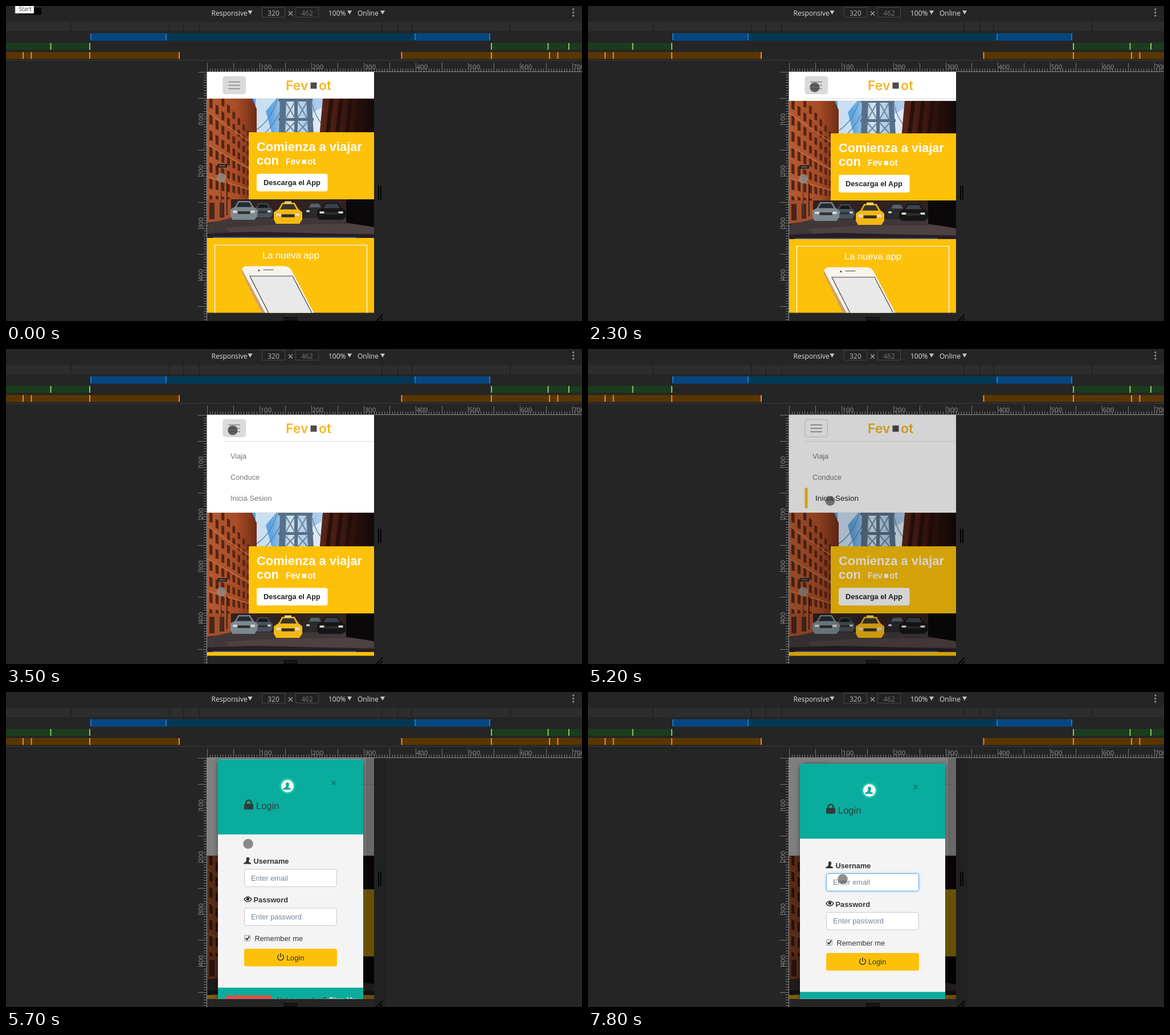
Recreate the animation shown at these times as an HTML page. Size 1011 px wide and 554 px high, loop 8 s.

```html
<!DOCTYPE html>
<html lang="es">
<head>
<meta charset="utf-8">
<title>Responsive page</title>
<style>
html, body { margin: 0; width: 100%; height: 100%; overflow: hidden; background: #252525; }
svg { display: block; width: 1011px; height: 554px; }
text { font-family: "Liberation Sans", Arial, sans-serif; font-size: 12.8px; }
.ui text { font-family: "Open Sans", "Noto Sans", sans-serif; font-size: 12px; fill: #dedede; }
.ruler text { font-family: "Open Sans", "Noto Sans", sans-serif; font-size: 11.5px; fill: #959595; }
.logo text { font-family: Inter, "Open Sans", sans-serif; font-size: 23px; font-weight: 600; }
.b { font-weight: bold; }
</style>
</head>
<body>
<svg id="stage" viewBox="0 0 1011 554"></svg>
<script>
const LOOP = 8000, SCALE = 0.915, YELLOW = '#fdc10a', TEAL = '#0aac9d';

const rect = (x, y, w, h, fill, more = '') =>
  `<rect x="${x}" y="${y}" width="${w}" height="${h}" fill="${fill}" ${more}/>`;
const text = (x, y, s, fill = '', more = '') =>
  `<text x="${x}" y="${y}" ${fill && `fill="${fill}"`} ${more}>${s}</text>`;
const path = (d, fill, more = '') => `<path d="${d}" fill="${fill}" ${more}/>`;
const line = (d, stroke, w = 1, more = '') =>
  `<path d="${d}" fill="none" stroke="${stroke}" stroke-width="${w}" ${more}/>`;
const circle = (x, y, r, fill, more = '') =>
  `<circle cx="${x}" cy="${y}" r="${r}" fill="${fill}" ${more}/>`;
const ticks = (xs, y, fill) => xs.map(x => rect(x - 1, y, 2, 12, fill)).join('');

const logo = (x, y, s, fill, mark) =>
  `<g class="logo" transform="translate(${x} ${y}) scale(${s})">` +
  text(0, 0, 'Fev', fill) + rect(43.5, -13, 11, 11, mark) + text(58, 0, 'ot', fill) + '</g>';

function toolbar() {
  const arrow = x => path(`M${x} 8h8l-4 7z`, '#c4c4c4');
  const box = (x, s, fill) => rect(x + .5, 2.5, 40, 17, '#222', 'stroke="#484848"') +
    text(x + 20.5, 17, s, '', `text-anchor="middle" style="fill:${fill}"`);
  return '<g class="ui">' + text(360.5, 17, 'Responsive') + arrow(424.5) +
    box(449, '320', '#bdbdbd') + line('M496 9.5l7 7m0-7l-7 7', '#aaa', 1.2) + box(508, '462', '#777') +
    text(566, 17, '100%') + arrow(599) + text(617, 17, 'Online') + arrow(657) +
    [6, 11.5, 17].map(y => circle(995.8, y, 1.7, '#8d8d8d')).join('') + '</g>';
}

function mediaBars() {
  return rect(0, 28, 1011, 16, '#2d2d2d') +
    [113, 286, 311, 339, 659, 687, 711, 884].map(x => rect(x, 28, 2, 16, '#222')).join('') +
    rect(148, 48, 702, 13, '#06467f') + rect(281, 48, 437, 13, '#043956') +
    ticks([149, 281, 718, 849], 48, '#1976ca') +
    rect(0, 65, 148, 12, '#1b3c1d') + rect(851, 65, 160, 12, '#1b3c1d') +
    ticks([78.5, 147, 852, 951.5, 988], 65, '#87c767') +
    rect(0, 81, 304, 12, '#593600') + rect(694, 81, 317, 12, '#593600') +
    ticks([30, 44.5, 147, 304, 694.5, 852, 954, 968.5], 81, '#f5861f') +
    rect(0, 95, 1011, 1, '#3c3c3c');
}

function rulers() {
  let h = '', v = '', labels = '';
  for (let n = 0; n <= 720; n += 5) {
    const p = n * SCALE, len = n % 50 ? 5 : 15;
    const x = Math.round(353 + p) + .5, y = Math.round(116 + p) + .5;
    h += `M${x} 115v${-len}`;
    if (y < 554) v += `M352 ${y}h${-len}`;
    if (n && n % 100 === 0) {
      labels += text(x + 1, 111, n);
      if (y < 554) labels += text(0, 0, n, '', `transform="translate(346 ${y}) rotate(-90)"`);
    }
  }
  return '<g class="ruler">' + line(h + v, '#777') +
    line('M353 115.5H1011M352.5 116V554', '#8a8a8a') + labels + '</g>';
}

function photo() {
  let s = rect(353, 163, 293, 245, 'url(#sky)');
  s += path('M438 163l36 0-18 22 10 37h-28zM538 188l20-12v46h-30z', '#eef4f8', 'opacity=".75"');
  s += line('M476 163Q465 205 432 222M488 166Q478 200 456 222M535 163Q543 200 562 215', '#5c7c9c', 1.2);
  s += path('M481 163h11l-2 60h-11zM506 163h6v60h-6zM527 163h9l4 60h-10z', '#587087');
  s += rect(478, 163, 60, 5, '#587087') + rect(478, 197, 62, 5, '#587087');
  s += line('M491 169l16 28m0-28l-16 28M512 169l16 28m0-28l-16 28M490 203l18 20m0-20l-18 20M512 203l18 20m0-20l-18 20', '#6d8498', 2);
  s += path('M353 163h79l8 18v166l-87 8z', 'url(#brick)');
  // Windows shrink towards the end of the street.
  for (let c = 0; c < 9; c++) {
    const x = 357 + c * 11 - c * c * .22, k = (x - 353) / 175;
    for (let r = 0; r < 8; r++) {
      const left = 128 + r * 29, y = left + (352 - left) * k, h = 17 * (1 - k);
      if (y > 160 && y < 336 && x < 434)
        s += path(`M${x} ${y}l${5.5 - c * .2} ${3 * (1 - k)}v${h}l${c * .2 - 5.5} -2z`, '#552516');
    }
  }
  s += line('M353 186L438 246M353 244L438 292M353 300L438 326', '#c97746', 1.3);
  s += path('M556 163h90v180H540z', 'url(#shade)');
  for (let i = 0; i < 4; i++)
    s += path(`M${568 + i * 17} 163h7l-7 60h-7z`, '#210d0a', 'opacity=".8"');
  s += rect(353, 340, 293, 68, '#30221f');
  s += path('M353 340h42v36l-42 5z', '#a34e2b') + path('M357 346h9v29h-9zM375 346h8v26h-8z', '#48251a');
  s += path('M353 383l42-10h251v35H353z', '#403738') + path('M385 390l100-6 161 0v16H395z', '#584b49', 'opacity=".55"');
  s += path('M597 340h49v49l-49-8z', '#0a0809') + path('M353 400l82-3 211 5v6H353z', '#271e25');
  const car = (x, y, w, h, body, glass) =>
    path(`M${x} ${y + h * .8}V${y + h * .45}l${w * .17}-${h * .15} ${w * .12}-${h * .3}h${w * .44}l${w * .13} ${h * .3} ${w * .14} ${h * .15}v${h * .35}l-${w * .1} ${h * .2}H${x + w * .08}z`, body) +
    path(`M${x + w * .22} ${y + h * .32}l${w * .1}-${h * .25}h${w * .38}l${w * .1} ${h * .25}z`, glass) +
    rect(x + w * .09, y + h * .51, w * .16, h * .12, '#dedbd2') + rect(x + w * .75, y + h * .51, w * .16, h * .12, '#dedbd2') +
    rect(x + w * .27, y + h * .55, w * .46, h * .14, '#302d2c');
  s += car(433, 347, 35, 25, '#47535d', '#17191d') + car(394, 343, 47, 33, '#7b8991', '#222a31');
  s += car(524, 346, 36, 26, '#28292c', '#596269') + car(546, 346, 50, 30, '#161619', '#3b4249');
  s += car(470, 346, 50, 37, '#f4b811', '#37342f') + rect(489, 343.5, 12, 4, '#fbd65e');
  s += rect(387, 310, 1.5, 58, '#291713') + rect(377, 284, 1.5, 84, '#53372c');
  s += rect(371, 278, 17, 6, '#241e20') + line('M374 281h11', '#aaa');
  s += circle(378, 302, 8.3, '#8f8c87', 'opacity=".85"');
  return s;
}

function page() {
  return '<g clip-path="url(#heroClip)">' + photo() + '</g>' +
    rect(353, 408, 293, 150, YELLOW) + rect(363, 406.5, 251, 1.5, '#4a77a8') +
    rect(426, 222, 220, 118, YELLOW) +
    text(440, 254.5, 'Comienza a viajar', '#fff', 'class="b" style="font-size:21.9px"') +
    text(440, 279, 'con', '#fff', 'class="b" style="font-size:21.9px"') +
    logo(491, 279, .66, '#fff', '#fff') +
    rect(440, 295, 124.5, 31, '#fff', 'rx="4"') + text(452, 315, 'Descarga el App', '#222', 'class="b"') +
    line('M366.5 560V420.5h267V560', '#fff', 1.2) +
    text(500, 444, 'La nueva app', '#fff', 'text-anchor="middle" style="font-size:16.5px"') +
    path('M414 463q2-5 9-5.500h65q9 0 13 7l44 84h-86z', '#f7f4ef') +
    path('M414 463l46 86h-7l-39-80z', '#cda16d') +
    path('M428 475h75l39 75h-76z', '#e9e9e9') + line('M466 550l-38-75h75l39 75', '#404040', 1.2) +
    line('M452 464h17', '#777', 1.5, 'stroke-linecap="round"') + circle(444, 465, 1.5, '#444');
}

function nav() {
  return '<rect id="navBg" x="353" y="116" width="293" height="47" fill="#fff"/>' +
    '<rect id="navEdge" x="353" width="293" height="1" fill="#e3e3e3"/>' +
    '<rect id="divider" x="381" y="162" width="265" height="1" fill="#dedede"/>' +
    '<rect id="burger" x="381" y="124" width="39.500" height="30.500" rx="4" stroke="#d0d0d0"/>' +
    line('M390.500 133.500h20.500M390.500 139.500h20.500M390.500 145.500h20.500', '#848484', 1.7) +
    logo(491, 147.500, 1, '#f3b824', '#4c4c4c') +
    '<g clip-path="url(#menuClip)">' + text(394, 193, 'Viaja', '#777') + text(394, 230, 'Conduce', '#777') +
    '<rect id="bar" x="380.500" y="244" width="5" height="36" fill="#fdc10a"/>' +
    '<text id="session" y="266.500">Inicia Sesion</text></g>';
}

function person(x, y, s, fill) {
  return `<g transform="translate(${x} ${y}) scale(${s})">` +
    path('M-3-3.500a3 3.800 0 0 1 6 0c0 2-.8 3.200-1.500 4v1.300l4.500 2v2.200h-14V3.800l4.500-2V.5C-2.200-.3-3-1.500-3-3.500z', fill) + '</g>';
}

function modal() {
  const input = (id, y, s) =>
    `<rect id="${id}" x="418.500" y="${y}" width="162" height="30.500" rx="3.500" fill="#fff" stroke="#c9c9c9"/>` +
    text(430, y + 19.700, s, '#74869a');
  return rect(372, 126, 255, 460, '#f4f4f4', 'rx="5" filter="url(#shadow)"') +
    path('M372 258V131q0-5 5-5h245q5 0 5 5v127z', TEAL) + rect(372, 527.500, 255, 60, TEAL) +
    circle(494, 173, 14.2, '#18c5a6') + circle(494, 173, 11, '#f5f5f5') + person(494, 173.500, .95, TEAL) +
    line('M571.500 163.500l7 7m0-7l-7 7', '#08776e', 1.700) +
    rect(418, 204, 16, 10, '#303b3a', 'rx="1"') + line('M421.500 205v-3a4.300 4 0 0 1 9 0v3', '#303b3a', 2.500) +
    text(439, 213.500, 'Login', '#333c3b', 'style="font-size:16.5px"') +
    person(424.500, 304.500, .9, '#333') + text(434.500, 309.500, 'Username', '#333', 'class="b"') + input('email', 319.500, 'Enter email') +
    path('M418 372q6.500-8.500 13 0q-6.500 8.500-13 0z', 'none', 'stroke="#333" stroke-width="1.5"') + circle(424.500, 371.500, 2.700, '#333') +
    text(434.500, 377.500, 'Password', '#333', 'class="b"') + input('password', 387.500, 'Enter password') +
    rect(418.500, 435.500, 10, 10, '#eee', 'rx="1.500" stroke="#999"') + line('M420.500 440.500l2.500 2.800 4-6', '#333', 1.900) +
    text(436.500, 445.500, 'Remember me', '#333') +
    rect(418, 459, 163, 31, YELLOW, 'rx="3.500"') +
    line('M479 469.500a5.300 5.300 0 1 0 6 0M482 467v7', '#333', 1.500) + text(492, 479, 'Login', '#333') +
    rect(386, 541, 80, 31, '#e0504c', 'rx="3.500"') +
    text(475, 553, 'Not a member? <tspan class="b" fill="#fff">Sign Up</tspan>', '#333') +
    '<rect id="caret" x="430" y="327" width="1" height="15" fill="#222"/>';
}

const stops = list => list.map(([o, c]) => `<stop offset="${o}" stop-color="${c}"/>`).join('');
document.getElementById('stage').innerHTML = `<defs>
  <linearGradient id="sky">${stops([[0, '#3f8cda'], [.38, '#5ca4e0'], [.5, '#cfe2ef'], [.62, '#9fc4e5'], [1, '#fff']])}</linearGradient>
  <linearGradient id="brick">${stops([[0, '#b65a30'], [.6, '#a84c26'], [1, '#6f2c17']])}</linearGradient>
  <linearGradient id="shade">${stops([[0, '#642a1b'], [.55, '#37150f'], [1, '#120809']])}</linearGradient>
  <clipPath id="screen"><rect x="353" y="116" width="293" height="423.500"/></clipPath>
  <clipPath id="heroClip"><rect x="353" y="163" width="293" height="244.500"/></clipPath>
  <clipPath id="menuClip"><rect id="menuBox" x="353" y="163" width="293" height="0"/></clipPath>
  <filter id="shadow" x="-10%" y="-10%" width="120%" height="120%"><feDropShadow dx="0" dy="2" stdDeviation="4" flood-opacity=".5"/></filter>
  <filter id="glow" x="-10%" y="-40%" width="120%" height="180%"><feDropShadow dx="0" dy="0" stdDeviation="2" flood-color="#66afe9" flood-opacity=".7"/></filter>
  </defs>` + rect(0, 0, 1011, 554, '#252525') + toolbar() + mediaBars() + rulers() +
  line('M654 316v25.500M657.800 316v25.500M487 548.500h25M487 552.500h25', '#050505', 2) +
  line('M650 554l11-11M656 554l5-5', '#050505', 2) +
  '<g clip-path="url(#screen)"><g id="page">' + page() + '</g>' + nav() +
  '<rect id="dim" x="353" y="116" width="293" height="424"/>' +
  '<rect id="scroll" x="632" y="116" width="14" height="424" opacity=".18"/>' +
  '<g id="modal">' + modal() + '</g>' +
  '<circle id="cursor" r="9" fill="#323232" stroke="#f4f4f4" stroke-opacity=".45"/></g>' +
  '<rect id="gutter" x="646" y="116" width="20" height="438" opacity=".12"/>' +
  '<g id="tip"><rect id="tipShadow" x="22" y="3" width="40" height="12.500" fill="#050505"/>' +
  rect(16, -2, 33, 15, '#fff', 'stroke="#777" stroke-width=".7"') +
  text(22.500, 9, 'Start', '#444', 'style="font-family:Open Sans,sans-serif;font-size:10px"') + '</g>';

const $ = Object.fromEntries([...document.querySelectorAll('[id]')].map(e => [e.id, e]));
const set = (e, attrs) => { for (const k in attrs) e.setAttribute(k, attrs[k]); };
const show = (e, on) => e.setAttribute('visibility', on ? 'visible' : 'hidden');

// Each row is a start time followed by the values held from then on.
const held = (rows, t) => rows.reduce((now, row) => t >= row[0] ? row : now);
const MENU = [[0, 0, 0], [2300, 4, 2], [2600, 35, 18], [2800, 63, 32], [3000, 72, 47], [3200, 112, 96], [3500, 125, 125]];
const DIM = [[0, 0], [5200, .17], [5300, .5]];
const MODAL = [[0, -120, 0], [5500, -75, .35], [5600, -30, .8], [5700, -7.5, 1], [5800, 0, 1]];
// Start, number of 100 ms steps, end point.
const MOVES = [[1400, 3, 398, 143], [4000, 6, 425, 267], [6300, 3, 444, 326], [6800, 2, 447, 329]];

function cursorAt(t) {
  let x = 345, y = 124;
  for (const [start, steps, tx, ty] of MOVES) {
    const p = Math.max(0, Math.min(1, (Math.floor((t - start) / 100) + 1) / steps));
    x += (tx - x) * p;
    y += (ty - y) * p;
  }
  return [x, y];
}

function draw(t) {
  const [, open, shift] = held(MENU, t);
  const [, slide, fade] = held(MODAL, t);
  const [x, y] = cursorAt(t);
  const chosen = t >= 5200, focus = t >= 7400;
  set($.page, { transform: `translate(0 ${shift})` });
  set($.navBg, { height: 47 + open });
  set($.navEdge, { y: 162 + open });
  set($.menuBox, { height: open });
  show($.divider, open > 0);
  set($.burger, { fill: chosen ? 'none' : '#dadada', stroke: chosen ? '#cfcfcf' : '#d4d4d4' });
  show($.bar, chosen);
  set($.session, { x: chosen ? 399 : 394, fill: chosen ? '#222' : '#777' });
  $.session.style.fontSize = chosen ? '13.4px' : '12.8px';
  set($.dim, { opacity: held(DIM, t)[1] });
  show($.scroll, t >= 5300);
  show($.gutter, t >= 5300);
  set($.modal, { transform: `translate(0 ${slide})`, opacity: fade });
  set($.email, focus
    ? { stroke: '#66afe9', filter: t >= 7500 ? 'url(#glow)' : 'none' }
    : { stroke: '#c9c9c9', filter: 'none' });
  show($.caret, focus && t < 7800);
  show($.cursor, t >= 1400);
  const pressed = t >= 1700 && t < 4000;
  set($.cursor, { cx: x, cy: y, 'fill-opacity': pressed ? .72 : t >= 5200 && t < 5500 ? .62 : .55 });
  show($.tip, t < 800);
  show($.tipShadow, t < 100);
}

const begin = performance.now();
function tick() {
  draw((performance.now() - begin) % LOOP);
  requestAnimationFrame(tick);
}
draw(0);
requestAnimationFrame(tick);
</script>
</body>
</html>
```
